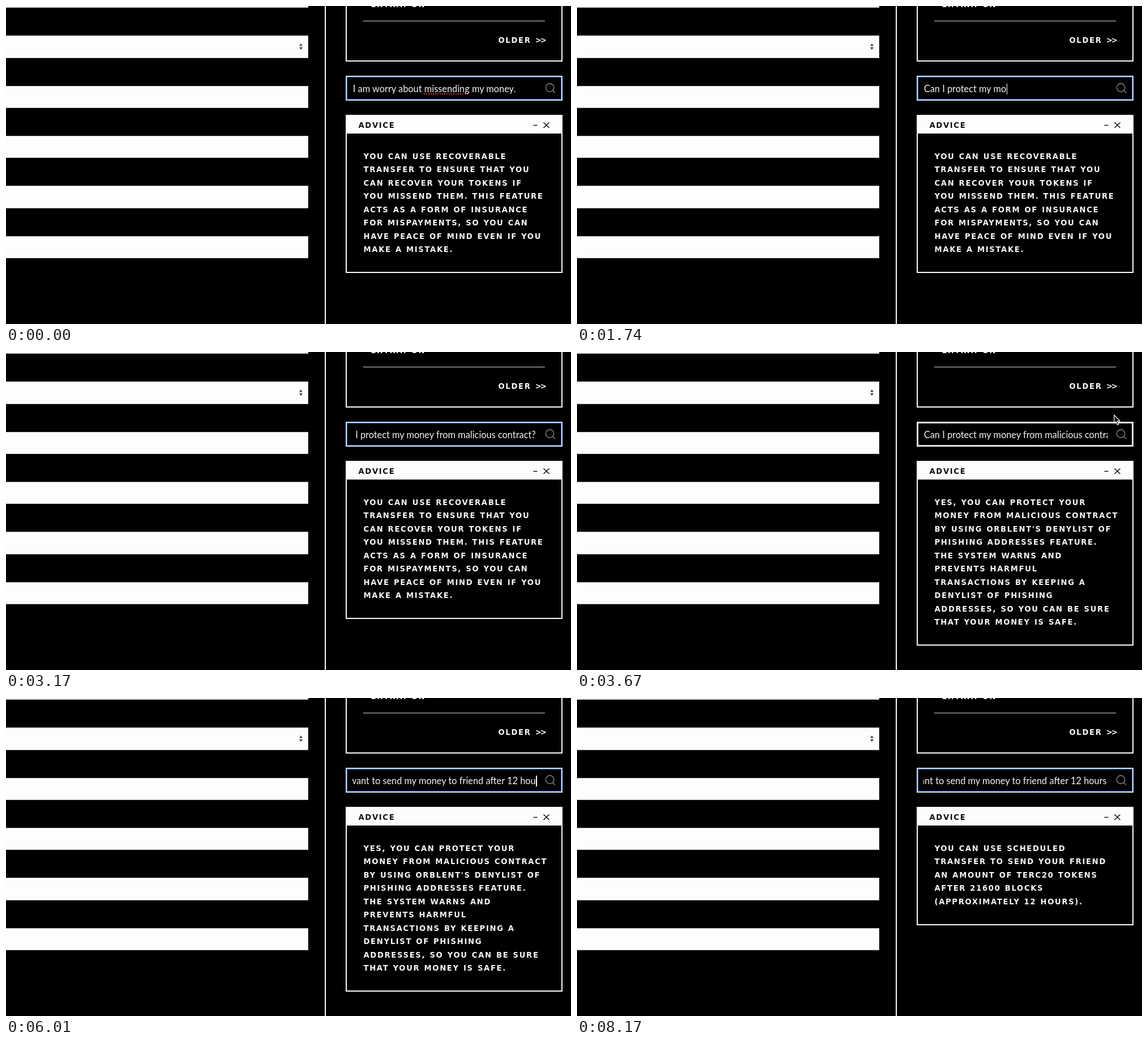
An HTML page for the animation above (8.27 s loop, 998x561 px).

```html
<!DOCTYPE html>
<html lang="en">
<head>
<meta charset="utf-8">
<title>Advice search</title>
<style>
html, body { margin: 0; width: 100%; height: 100%; overflow: hidden; background: #000; }
body { position: relative; }
body > *, .panel > .tools { position: absolute; box-sizing: border-box; }

.pixel {
  font: bold 13.2px/23.5px "DejaVu Sans", sans-serif;
  letter-spacing: 1.65px; word-spacing: 1px; white-space: pre; color: #f6f6f6;
}
.arrows { letter-spacing: -2px; }

.bar { left: 0; width: 534px; height: 39.4px; background: #fdfdfc; border: 1px solid #c8c8c8; border-left: 0; }
.divider { left: 562.7px; top: 0; width: 2.4px; height: 561px; background: #fafafa; }
.frame { left: 600px; width: 383px; border: 2px solid #fafafa; }
.history { top: -40px; height: 138px; }
.rule { left: 631px; top: 26px; width: 321px; height: 1.4px; background: #d8d8d8; }

.field { top: 123px; height: 44px; border: 3px solid #e2e2e4; }
.field.focus { border-color: #c9dbf3; border-width: 2px; box-shadow: inset 0 0 0 1px #2f6fd8; }
.query {
  left: 612px; top: 131.5px; width: 326px; height: 28px; overflow: hidden;
  font: 16.35px/28px Lato, sans-serif; color: #f4f4f4; white-space: pre;
}
.query u { text-decoration: underline dotted #e0352b 2px; text-underline-offset: 3px; text-decoration-skip-ink: none; }
#text { margin-left: .8px; }
.caret {
  display: inline-block; width: 1.4px; height: 19px; margin-left: .6px;
  background: #fff; vertical-align: -4px;
}

.panel { top: 192px; }
.head { height: 31px; line-height: 33px; padding-left: 20.5px; background: #fdfdfc; color: #111; }
.tools { left: 328px; top: 10px; }
.body { padding: 28.7px 0 27.8px 29.5px; }
svg { overflow: visible; }
</style>
</head>
<body>
<div class="divider"></div>

<div class="frame history"></div>
<div class="pixel" style="left:644.5px;top:-14px">EXTRA: ON</div>
<div class="rule"></div>
<div class="pixel" style="left:869.5px;top:48.5px">OLDER <span class="arrows">&gt;&gt;</span></div>

<div class="frame field" id="field"></div>
<div class="query" id="query"><span id="text"></span><span class="caret" id="caret"></span></div>
<svg style="left:952px;top:135px" width="20" height="20" fill="none" stroke="#858585" stroke-width="1.4">
  <circle cx="8.6" cy="9" r="7.2"/><path d="M13.8 14.2 18 18.4"/>
</svg>

<div class="frame panel">
  <div class="pixel head">ADVICE</div>
  <svg class="tools" width="32" height="14" fill="none" stroke="#151515" stroke-width="1.7">
    <path d="M1.5 6.5h7M19.5 1.5l10 9.5M29.5 1.5l-10 9.5"/>
  </svg>
  <div class="pixel body" id="advice"></div>
</div>

<svg style="left:517px;top:66px" width="8" height="12" fill="#444">
  <path d="M1 4.6 3.9 0 6.8 4.6ZM1 6.8h5.8L3.9 11.4Z"/>
</svg>
<svg id="mouse" style="left:0;top:0" width="14" height="20" fill="#000" stroke="#fff" stroke-width="1.3" stroke-linejoin="round">
  <path d="M.8.8V15.2L4 12.2 6.4 17.8 8.8 16.8 6.5 11.4H11Z"/>
</svg>

<script>
const LOOP = 8270;
const $ = id => document.getElementById(id);

const questions = [
  'I am worry about missending my money.',
  'Can I protect my money from malicious contract?',
  'I want to send my money to friend after 12 hours'
];
const answers = [
`YOU CAN USE RECOVERABLE
TRANSFER TO ENSURE THAT YOU
CAN RECOVER YOUR TOKENS IF
YOU MISSEND THEM. THIS FEATURE
ACTS AS A FORM OF INSURANCE
FOR MISPAYMENTS, SO YOU CAN
HAVE PEACE OF MIND EVEN IF YOU
MAKE A MISTAKE.`,
`YES, YOU CAN PROTECT YOUR
MONEY FROM MALICIOUS CONTRACT
BY USING ORBLENT'S DENYLIST OF
PHISHING ADDRESSES FEATURE.
THE SYSTEM WARNS AND
PREVENTS HARMFUL
TRANSACTIONS BY KEEPING A
DENYLIST OF PHISHING
ADDRESSES, SO YOU CAN BE SURE
THAT YOUR MONEY IS SAFE.`,
`YOU CAN USE SCHEDULED
TRANSFER TO SEND YOUR FRIEND
AN AMOUNT OF TERC20 TOKENS
AFTER 21600 BLOCKS
(APPROXIMATELY 12 HOURS).`
];

for (let i = 0; i < 6; i++) {
  const bar = document.createElement('div');
  bar.className = 'bar';
  bar.style.top = 88.4 * i - 36.2 + 'px';
  document.body.prepend(bar);
}

const typed = (q, t, start, step) => q.slice(0, Math.max(0, Math.floor((t - start) / step)));

function queryAt(t) {
  if (t < 1000) return questions[0];
  if (t < 4400) return typed(questions[1], t, 1285, 23.6);
  return typed(questions[2], t, 4564, 31);
}

function caretOn(t) {
  const typing = (t > 1285 && t < 2420) || (t > 4564 && t < 6080);
  return typing || (t + (t < 1285 ? 100 : 230)) % 300 >= 150;
}

const ease = x => { x = Math.min(1, Math.max(0, x)); return x * x * (3 - 2 * x); };

let shownText, shownAnswer;
function draw(t) {
  const focused = t < 3370 || t >= 4250;
  $('field').classList.toggle('focus', focused);

  const text = queryAt(t);
  if (text !== shownText) {
    $('text').innerHTML = text.replace('missending', '<u>$&</u>');
    shownText = text;
  }
  $('caret').style.visibility = focused && caretOn(t) ? 'visible' : 'hidden';
  $('query').scrollLeft = focused ? 1e4 : 0;

  const n = t < 3200 ? 0 : t < 7010 ? 1 : 2;
  if (n !== shownAnswer) {
    $('advice').textContent = answers[n];
    shownAnswer = n;
  }

  // The pointer leaves the field, rests above it, then returns.
  const away = ease((t - 3300) / 330) - ease((t - 4000) / 250);
  const x = 930 + 18 * away, y = 144.5 - 34 * away;
  $('mouse').style.transform = `translate(${x}px, ${y}px)`;
  $('mouse').style.visibility = t >= 3300 && t < 4560 ? 'visible' : 'hidden';
}

const begin = performance.now();
function tick() {
  draw((performance.now() - begin) % LOOP);
  requestAnimationFrame(tick);
}
tick();
</script>
</body>
</html>
```
